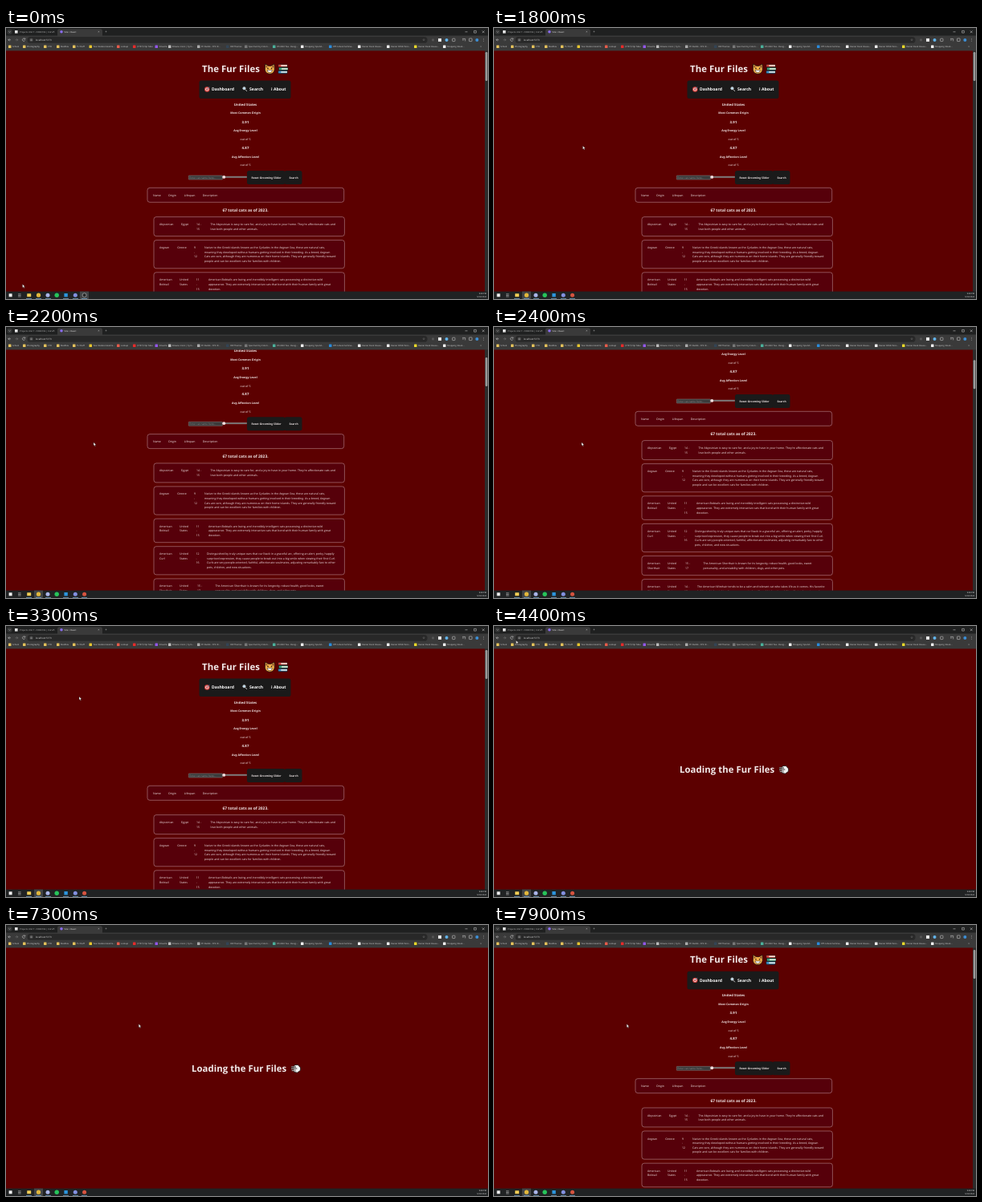
These frames come from a looping animation (600 by 338 pixels, 8000 ms). An HTML page with a canvas:

```html
<!DOCTYPE html>
<html lang="en">
<head>
<meta charset="utf-8">
<title>Cat dashboard</title>
<style>
  html, body { margin: 0; width: 100%; height: 100%; overflow: hidden; background: #5c0000; }
  canvas { display: block; width: 600px; height: 338px; }
</style>
</head>
<body>
<canvas id="stage"></canvas>
<script>
const LOOP = 8000;
const RELOAD = 4200, LOADED = 7550;
const canvas = document.getElementById("stage");
const ctx = canvas.getContext("2d");
const dpr = window.devicePixelRatio || 1;
canvas.width = 600 * dpr;
canvas.height = 338 * dpr;

// Keyframes: time, value(s)
const pointer = [
  [0, 20.5, 319.5], [400, 20.5, 319.5], [1500, 110.5, 147], [1900, 110.5, 147], [2200, 109, 143.8],
  [2800, 109, 143.8], [3250, 91, 88], [3500, 91, 88], [4000, 21, 13], [4350, 21, 13], [5500, 165.2, 123.5]
];
const scrolling = [[0, 0], [2000, 0], [2200, 65.5], [2350, 94], [2450, 94], [2650, 0], [7800, 0], [7900, 7.5], [8000, 22]];

const cats = [
  ["Abyssinian", "Egypt", "14 -|15", [218, 237, 254.5],
    "The Abyssinian is easy to care for, and a joy to have in your home. They're affectionate cats and|love both people and other animals."],
  ["Aegean", "Greece", "9|-|12", [213.3, 234, 247],
    "Native to the Greek islands known as the Cyclades in the Aegean Sea, these are natural cats,|meaning they developed without humans getting involved in their breeding. As a breed, Aegean|Cats are rare, although they are numerous on their home islands. They are generally friendly toward|people and can be excellent cats for families with children."],
  ["American|Bobtail", "United|States", "11|-|15", [216, 236.7, 252],
    "American Bobtails are loving and incredibly intelligent cats possessing a distinctive wild|appearance. They are extremely interactive cats that bond with their human family with great|devotion."],
  ["American|Curl", "United|States", "12|-|16", [216, 236.5, 250],
    "Distinguished by truly unique ears that curl back in a graceful arc, offering an alert, perky, happily|surprised expression, they cause people to break out into a big smile when viewing their first Curl.|Curls are very people-oriented, faithful, affectionate soulmates, adjusting remarkably fast to other|pets, children, and new situations."],
  ["American|Shorthair", "United|States", "15 -|17", [216, 238, 260.5],
    "The American Shorthair is known for its longevity, robust health, good looks, sweet|personality, and amiability with children, dogs, and other pets."],
  ["American|Wirehair", "United|States", "14 -|18", [216, 237, 253],
    "The American Wirehair tends to be a calm and tolerant cat who takes life as it comes. His favorite|hobby is bird-watching from a sunny windowsill, and his hunting ability will stand you in good|stead if insects enter the house."]
];

const FOLDER = "#e3c15b";
const bookmarks = [
  [3, FOLDER, "School"], [21, FOLDER, "Photography"], [47, FOLDER, "CTD"], [63, FOLDER, "MedDev"],
  [83, FOLDER, "TU Stuff"], [103.5, "#e6c52f", "Your Redecorated G..."], [138, "#e65c4b", "Lookup"],
  [158, "#e62b2b", "(1767) Clip Tube"], [185.5, "#9257e8", "Streams"], [202, "#bbb", "Browse Icons | Sym..."],
  [238, "#aaa", "PC Builds - CPU R..."], [274, "#345", "IDE Themes"], [297, "#777", "Spectrum by Colori..."],
  [332, "#4bb09b", "Oh Mint Tea - Desig..."], [367, "#eee", "Shopping: Spend..."],
  [402, "#2a8bdc", "Off-n-Desk Semina..."], [438, "#eee", "Owner Desk House..."],
  [474, "#eee", "Owner DESK Pens..."], [508, "#e6d72b", "Owner Desk House..."], [544, "#eee", "Shopping: Book..."]
];

function at(keys, t) {
  const next = keys.findIndex(k => k[0] > t);
  if (next < 0) return keys[keys.length - 1].slice(1);
  const a = keys[next - 1], b = keys[next], p = (t - a[0]) / (b[0] - a[0]);
  return a.slice(1).map((v, i) => v + (b[i + 1] - v) * p);
}

// y is the middle of the capitals; glyphs are laid out large for exact spacing
function text(str, x, y, size, { bold = false, align = "left", color = "#f2e9e9" } = {}) {
  ctx.save();
  ctx.translate(x, y + size * 0.36);
  ctx.scale(0.1, 0.1);
  ctx.font = `${bold ? "bold " : ""}${size * 10}px "Open Sans", sans-serif`;
  ctx.textAlign = align;
  ctx.fillStyle = color;
  ctx.fillText(str, 0, 0);
  ctx.restore();
}
function lines(str, x, y, size) {
  str.split("|").forEach((s, i) => text(s, x, y + i * 5.6, size));
}
function rect(x, y, w, h, color) {
  ctx.fillStyle = color;
  ctx.fillRect(x, y, w, h);
}
function box(x, y, w, h, r, fill, stroke, width = 0.5) {
  ctx.beginPath();
  ctx.roundRect(x, y, w, h, r);
  paint(fill, stroke, width);
}
function dot(x, y, r, fill, stroke, width = 0.5) {
  ctx.beginPath();
  ctx.arc(x, y, r, 0, 7);
  paint(fill, stroke, width);
}
function shape(path, fill, stroke, width = 0.5) {
  const p = new Path2D(path);
  ctx.lineWidth = width;
  if (fill) { ctx.fillStyle = fill; ctx.fill(p); }
  if (stroke) { ctx.strokeStyle = stroke; ctx.stroke(p); }
}
function paint(fill, stroke, width) {
  if (fill) { ctx.fillStyle = fill; ctx.fill(); }
  if (stroke) { ctx.strokeStyle = stroke; ctx.lineWidth = width; ctx.stroke(); }
}

function catFace() {
  shape("M322.6 45l4 2.3h3.4l4-2.3.3 7q-1 5.2-6 5.2t-6-5.2z", "#f5b04a", "#1d1414", 0.8);
  shape("M323.6 46.8l2 1.2-1.7 2zM333 46.8l-2 1.2 1.7 2z", "#6d3a24");
  dot(326, 50.4, 0.8, "#1d1414");
  dot(330.6, 50.4, 0.8, "#1d1414");
  shape("M325 52.6h6.6q-.6 3-3.3 3t-3.3-3z", "#fff", "#1d1414", 0.5);
}
function books() {
  ["#d8413c", "#39a883", "#3c8fca"].forEach((color, i) => {
    const y = 45.2 + i * 4, x = 338.8 + (i % 2) * 0.8;
    box(x, y, 11.4, 3.6, 0.8, color, "#161616", 0.7);
    rect(x + 3.5, y + 1, 7.7, 1.5, "#f3f0e4");
  });
}
function targetIcon() {
  dot(250.3, 76.5, 3.2, "#d9413d");
  dot(250.3, 76.5, 2.1, "#f4ecec");
  dot(250.3, 76.5, 1.2, "#d9413d");
  shape("M250.3 76.5l2.8-3", null, "#4aa3d8", 0.7);
}
function searchIcon() {
  dot(296.5, 75.2, 1.7, "#b9d9ea", "#d5d5d5", 0.6);
  shape("M297.7 76.5l2.2 2.4", null, "#d5d5d5", 0.9);
}
function dash() {
  shape("M361 174.4q3.4-.6 4 2 2.2.9 1.6 3.2.2 2.8-2.2 3.2-1.6 2.2-4 .9-2.6.2-2.4-2.2l-.2-4.6q.6-2.4 3.2-2.5z", "#f1f1f1", "#161010", 0.8);
  shape("M355 177h6M354.6 179.3h7.6M355.4 181.6h5.6", null, "#161010", 1.5);
  shape("M355.2 177h6M355 179.3h7.4M355.7 181.6h5.4", null, "#e4e4e4", 0.8);
}

function page(scroll) {
  const center = { align: "center" }, heading = { align: "center", bold: true };
  ctx.save();
  ctx.translate(0, -scroll);
  text("The Fur Files", 244, 51, 11.5, { bold: true });
  catFace();
  books();

  box(240.5, 65.5, 114, 22.5, 2.5, "#1a1a1a");
  targetIcon();
  searchIcon();
  text("Dashboard", 256, 76.4, 5.15, { bold: true, color: "#fff" });
  text("Search", 303, 76.4, 5.15, { bold: true, color: "#fff" });
  text("i About", 330, 76.4, 5.15, { bold: true, color: "#fff" });

  text("United States", 298, 95, 4.2, heading);
  text("Most Common Origin", 298, 106, 3.55, heading);
  text("3.91", 298, 117, 4.4, heading);
  text("Avg Energy Level", 298, 128.2, 3.55, heading);
  text("out of 5", 298, 139, 3.6, center);
  text("4.87", 298, 149.4, 4.4, heading);
  text("Avg Affection Level", 298, 160.4, 3.55, heading);
  text("out of 5", 298, 171.2, 3.6, center);

  box(227.4, 184, 42, 5, 0.3, "#3b3b3b", "#858585", 0.5);
  text("Enter cat name here...", 228.5, 186.6, 3.2, { color: "#8a8a8a" });
  box(269, 184.9, 31, 1.8, 0.9, "#777", "#8f8585", 0.3);
  dot(271.3, 185.9, 1.9, "#f1dede");
  box(300, 178, 47.5, 17, 2.5, "#1a1a1a");
  box(346.5, 178, 22, 17, 2.5, "#1a1a1a");
  text("Reset Grooming Slider", 324, 186.5, 3.35, heading);
  text("Search", 358, 186.5, 3.35, heading);

  const card = "#56000a", edge = "#c9a3a8";
  box(176, 199.3, 244.7, 18, 3, card, edge);
  [["Name", 183], ["Origin", 202], ["Lifespan", 221.7], ["Description", 244.7]]
    .forEach(([label, x]) => text(label, x, 208.7, 3.5));
  text("67 total cats as of 2023.", 298, 227, 4.95, heading);

  let top = 235.6;
  for (const [name, origin, span, [x1, x2, x3], about] of cats) {
    const height = 12.8 + 5.6 * about.split("|").length;
    box(184, top, 237.4, height, 3, card, edge);
    const y = top + 9.3;
    lines(name, 191, y, 3.52);
    lines(origin, x1, y, 3.52);
    lines(span, x2, y, 3.52);
    lines(about, x3, y, 3.52);
    top += height + 5;
  }
  ctx.restore();

  rect(596, 28, 4, 301, "#2c2c2c");
  box(596.7, 30 + scroll * 0.12, 2.7, 36, 1.2, "#9a9a9a");
}

function browser() {
  const gray = "#c4c4c4", icon = { color: gray, align: "center" };
  rect(0, 0, 600, 10, "#1f2020");
  rect(0, 9.5, 600, 18.9, "#3a3a3a");
  box(64, 1.2, 56, 10, [2.5, 2.5, 0, 0], "#3a3a3a");
  box(1.5, 1.8, 6, 6, 2, "#353636");
  shape("M3.4 4.3l1.1 1.1 1.1-1.1", null, gray, 0.6);
  rect(11, 3, 3.6, 3.6, "#e4e4e4");
  text("Projects Unit 7 - CODE102 | Intro...", 17, 4.8, 2.7, { color: gray });
  dot(69, 4.8, 1.8, "#8a6cf0");
  text("Vite + React", 72.5, 4.8, 2.75, { color: "#eee" });
  text("×", 59.5, 4.8, 4, icon);
  text("×", 115.5, 4.8, 4, icon);
  text("+", 124.5, 4.8, 4.5, icon);
  shape("M571.5 4.8h3M592.8 3.4l2.8 2.8M595.6 3.4l-2.8 2.8M582.6 3.4h2.7v2.7h-2.7z", null, "#ddd", 0.5);

  shape("M6 14.8H2.8l1.5-1.5M2.8 14.8l1.5 1.5", null, gray, 0.6);
  shape("M11.6 14.8h3.2l-1.5-1.5M14.8 14.8l-1.5 1.5", null, "#777", 0.6);
  shape("M23.6 13.8a1.7 1.7 0 1 0 .1 1.6M23.8 12.6v1.4h-1.4", null, gray, 0.6);
  box(26.5, 11, 498, 7.8, 3.9, "#282828");
  dot(31.5, 14.9, 2.4, "#3c3c3c");
  shape("M30.3 14.2h2.4M30.3 15.6h2.4", null, gray, 0.5);
  text("localhost:5173", 36.8, 14.8, 2.95, { color: "#e6e6e6" });
  text("☆", 520, 14.8, 4, icon);
  dot(531.5, 14.9, 1.6, "#555");
  rect(538, 13, 4, 4, "#e8e8e8");
  dot(548.5, 14.9, 2, "#62b4ea");
  box(555.6, 13.2, 3.4, 3.4, 0.6, null, gray, 0.6);
  shape("M568 13.4h3M568 15h2M571.6 13v3.4", null, gray, 0.6);
  box(576.5, 13, 3.6, 3.6, 0.4, null, gray, 0.6);
  dot(586.3, 14.9, 2, "#3d8fd6");
  [13.2, 14.8, 16.4].forEach(y => dot(594.5, y, 0.4, gray));

  for (const [x, color, label] of bookmarks) {
    box(x, 21.5, 3.5, 3.5, 0.5, color);
    text(label, x + 5, 23.3, 2.65, { color: "#d6d6d6" });
  }
  text("»", 591, 23.2, 3.5, icon);
}

function taskbar(recording) {
  rect(0, 328.6, 600, 9.4, "#202223");
  rect(recording ? 35 : 92, 328.6, 11, 9.4, "#424446");
  rect(3.6, 331.3, 4, 4, "#f0f0f0");
  shape("M15 331.8h3.6M15 333.4h3.6M15 335h3.6", null, "#ccc", 0.6);
  box(26.2, 331.2, 5, 4, 0.5, "#f0cd55");
  dot(40.5, 333.2, 2.6, "#e2b83c");
  dot(52, 333.2, 2.5, "#a9b4e8");
  dot(63.2, 333.2, 2.7, "#27c45a");
  rect(72.4, 331, 4.4, 4.4, "#2c95dd");
  dot(86.3, 333.2, 2.5, "#8390e0");
  if (recording) dot(97.6, 333.2, 2.5, "#d6533f");
  else dot(97.6, 333.2, 2.5, "#262626", "#c8c8c8", 0.6);
  [25, 37, 49, 71, 83, 94].forEach(x => rect(x, 337.3, 7, 0.7, "#76a9d0"));
  text("9:48 PM", 598, 331.3, 2.5, { align: "right", color: "#eee" });
  text("5/22/2024", 598, 335.4, 2.5, { align: "right", color: "#eee" });
}

function arrow(x, y) {
  ctx.save();
  ctx.translate(x, y);
  shape("M0 0v4.2l1-.8.7 1.5.8-.4-.7-1.4h1.3z", "#fff", "#1a1010", 0.35);
  ctx.restore();
}

function draw(t) {
  ctx.setTransform(dpr, 0, 0, dpr, 0, 0);
  ctx.textRendering = "geometricPrecision";
  rect(0, 0, 600, 338, "#5c0000");
  if (t >= RELOAD && t < LOADED) {
    text("Loading the Fur Files", 231, 179.3, 11.45, { bold: true });
    dash();
  } else {
    page(at(scrolling, t)[0]);
  }
  browser();
  taskbar(t >= 400);
  arrow(...at(pointer, t));
}

function tick() {
  draw(performance.now() % LOOP);
  requestAnimationFrame(tick);
}
tick();
</script>
</body>
</html>
```
